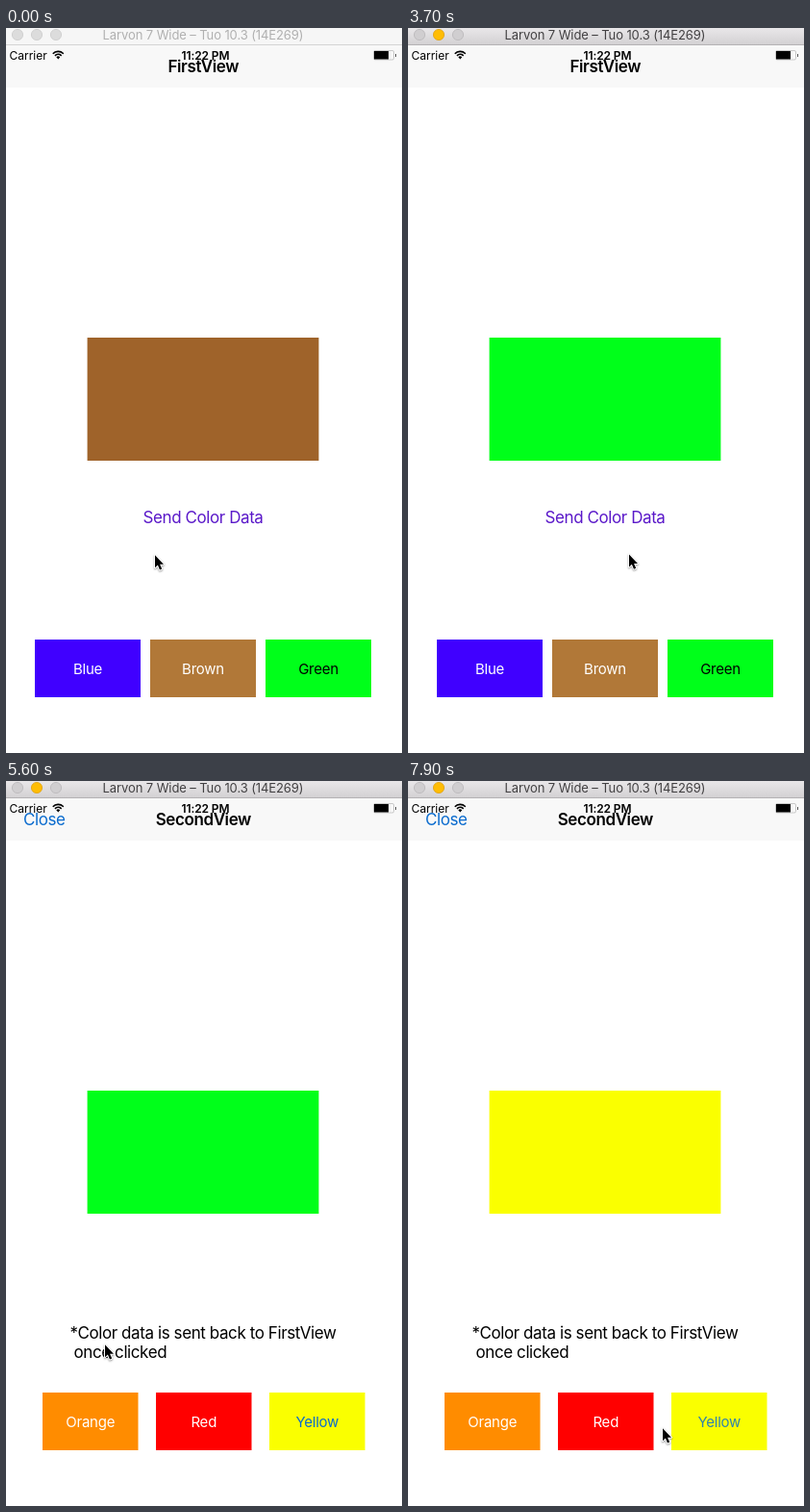
An HTML page with a canvas that plays this animation: 412x754 px, repeating every 8 s.

```html
<!DOCTYPE html>
<html lang="en">
<head>
<meta charset="utf-8">
<title>Color Data</title>
<style>
  html, body { margin: 0; width: 100%; height: 100%; overflow: hidden; background: #fff; }
  canvas { display: block; width: 412px; height: 754px; }
</style>
</head>
<body>
<canvas id="stage"></canvas>
<script>
const W = 412, H = 754, LOOP = 8000, STEP = 100;
const canvas = document.getElementById('stage');
const ctx = canvas.getContext('2d');
const dpr = window.devicePixelRatio || 1;
canvas.width = W * dpr;
canvas.height = H * dpr;

const BROWN = '#9f632a', GREEN = '#00ff1a', LINK = '#0a6bce';
const ACTIVE_AT = 1400, OPEN_AT = 4500, CLICK = 100, FADE = 250;

// Each button is clicked once, at `press`, with the pointer tip on `aim`
const row = (x, pitch, w, buttons) =>
  buttons.map((b, i) => ({ x: x + i * pitch, w, release: b.press + CLICK, ...b }));

const firstRow = row(30, 120, 110, [
  { label: 'Blue', fill: '#4000ff', ink: '#fff', press: 1800, aim: [90, 679] },
  { label: 'Brown', fill: '#b17838', ink: '#fff', press: 2500, aim: [191, 667], set: BROWN },
  { label: 'Green', fill: GREEN, ink: '#000', press: 3200, aim: [294, 652] }
]);
const secondRow = row(38, 118, 99.5, [
  { label: 'Orange', fill: '#ff8c00', ink: '#fff', press: 6200, aim: [94, 683] },
  { label: 'Red', fill: '#ff0000', ink: '#fff', press: 7000, aim: [170, 674] },
  { label: 'Yellow', fill: '#faff00', ink: LINK, press: 7600, aim: [296, 668] }
]);

// The pointer rests at each stop and glides between them
const rest = (from, till, x, y) => ({ from, till, x, y });
const visit = b => rest(b.press, b.release + 100, ...b.aim);
const stops = [
  rest(0, 400, 154, 547),
  ...firstRow.map(visit),
  rest(4200, 5400, 208, 512),
  rest(5600, 5600, 102, 585),
  ...secondRow.map(visit),
  rest(7900, LOOP, 264, 672)
];

function pointerAt(t) {
  const i = stops.findIndex(s => t <= s.till);
  const b = stops[i], a = stops[i - 1];
  if (t >= b.from) return [b.x, b.y];
  const e = 1 - (1 - (t - a.till) / (b.from - a.till)) ** 3;
  return [a.x + (b.x - a.x) * e, a.y + (b.y - a.y) * e];
}

function rect(x, y, w, h, fill) {
  ctx.fillStyle = fill;
  ctx.fillRect(x, y, w, h);
}

function text(str, x, y, { size = 17, weight = 400, track = -0.41, ink = '#000', align = 'left' } = {}) {
  ctx.font = `${weight} ${size}px Inter, Roboto, sans-serif`;
  ctx.letterSpacing = track + 'px';
  ctx.textAlign = align;
  ctx.fillStyle = ink;
  ctx.fillText(str, x, y);
}

function swatchColor(buttons, t, start) {
  return buttons.reduce((c, b) => t >= b.release ? b.set || b.fill : c, start);
}

function labelAlpha(b, t) {
  if (t < b.press) return 1;
  return Math.min(1, 0.2 + 0.8 * Math.max(0, t - b.release) / FADE);
}

function drawButtons(buttons, t) {
  for (const b of buttons) {
    rect(b.x, 636, b.w, 60, b.fill);
    ctx.globalAlpha = labelAlpha(b, t);
    text(b.label, b.x + b.w / 2, 671.5, { size: 15, track: -0.24, ink: b.ink, align: 'center' });
    ctx.globalAlpha = 1;
  }
}

function drawPage(title, color) {
  rect(0, 18, W, H, '#fff');
  rect(0, 18, W, 44, '#f8f8f8');
  text(title, 205.3, 46, { weight: 600, align: 'center' });
  rect(84.6, 322, 240.8, 128, color);
}

function drawFirst(t) {
  drawPage('FirstView', swatchColor(firstRow, t, BROWN));
  text('Send Color Data', 205, 514.5, { ink: '#5a18c9', align: 'center' });
  drawButtons(firstRow, t);
}

function drawSecond(t) {
  const age = t - OPEN_AT;
  const shift = 122 * Math.exp(-age / 110);
  ctx.save();
  ctx.translate(0, Math.round(shift));
  drawPage('SecondView', swatchColor(secondRow, t, GREEN));
  text('Close', 18, 46, { ink: LINK });
  text('*Color data is sent back to FirstView', 66.5, 580);
  text('once clicked', 70.5, 600);
  drawButtons(secondRow, t);
  ctx.restore();
}

function drawStatus() {
  text('Carrier', 3.5, 33, { size: 12, track: 0 });
  text('11:22 PM', 207.5, 33, { size: 12, weight: 600, track: -0.1, align: 'center' });

  // Wi-Fi fan
  ctx.strokeStyle = ctx.fillStyle = '#000';
  ctx.lineWidth = 1.6;
  for (const r of [4.6, 7.6]) {
    ctx.beginPath();
    ctx.arc(54.3, 32, r, -Math.PI * 0.76, -Math.PI * 0.24);
    ctx.stroke();
  }
  ctx.beginPath();
  ctx.moveTo(54.3, 32.6);
  ctx.arc(54.3, 32, 2.6, -Math.PI * 0.78, -Math.PI * 0.22);
  ctx.fill();

  // Battery
  ctx.lineWidth = 0.5;
  ctx.strokeStyle = '#999';
  ctx.beginPath();
  ctx.roundRect(382.5, 23.5, 21, 9.5, 1.5);
  ctx.stroke();
  rect(383, 24, 15, 8.5, '#000');
  rect(405, 27, 1, 3, '#555');
}

function drawTitleBar(active) {
  const g = ctx.createLinearGradient(0, 0, 0, 17);
  g.addColorStop(0, active ? '#e9e7e9' : '#f6f6f6');
  g.addColorStop(1, active ? '#d3d1d3' : '#f6f6f6');
  rect(0, 0, W, 17, g);
  rect(0, 17, W, 1, active ? '#b4b2b4' : '#d4d4d4');
  for (let i = 0; i < 3; i++) {
    const lit = active && i === 1;
    ctx.beginPath();
    ctx.arc(12 + i * 20, 7, 5.6, 0, Math.PI * 2);
    ctx.fillStyle = lit ? '#ffbd05' : active ? '#d0ced0' : '#dcdcdc';
    ctx.fill();
    ctx.lineWidth = 0.8;
    ctx.strokeStyle = lit ? '#e0a010' : active ? '#b9b7b9' : '#cbcbcb';
    ctx.stroke();
  }
  text('Larvon 7 Wide – Tuo 10.3 (14E269)', 205, 12, {
    size: 13, track: -0.1, ink: active ? '#424042' : '#b0b0b0', align: 'center'
  });
}

const arrow = new Path2D('M1 1.2V14.2L3.9 11.5L6 16.5L8.2 15.6L6.1 10.7H10Z');

function drawPointer(x, y) {
  ctx.save();
  ctx.translate(x, y);
  ctx.lineJoin = 'round';
  ctx.shadowColor = 'rgba(0,0,0,.4)';
  ctx.shadowBlur = 2 * dpr;
  ctx.shadowOffsetY = dpr;
  ctx.lineWidth = 2;
  ctx.strokeStyle = '#fff';
  ctx.stroke(arrow);
  ctx.shadowColor = 'transparent';
  ctx.fillStyle = '#000';
  ctx.fill(arrow);
  ctx.restore();
}

function draw(t) {
  ctx.setTransform(dpr, 0, 0, dpr, 0, 0);
  drawFirst(t);
  if (t >= OPEN_AT) drawSecond(t);
  drawStatus();
  drawTitleBar(t >= ACTIVE_AT);
  drawPointer(...pointerAt(t));
}

const start = performance.now();
function tick() {
  const t = (performance.now() - start) % LOOP;
  draw(Math.floor(t / STEP) * STEP);
  requestAnimationFrame(tick);
}
tick();
</script>
</body>
</html>
```
